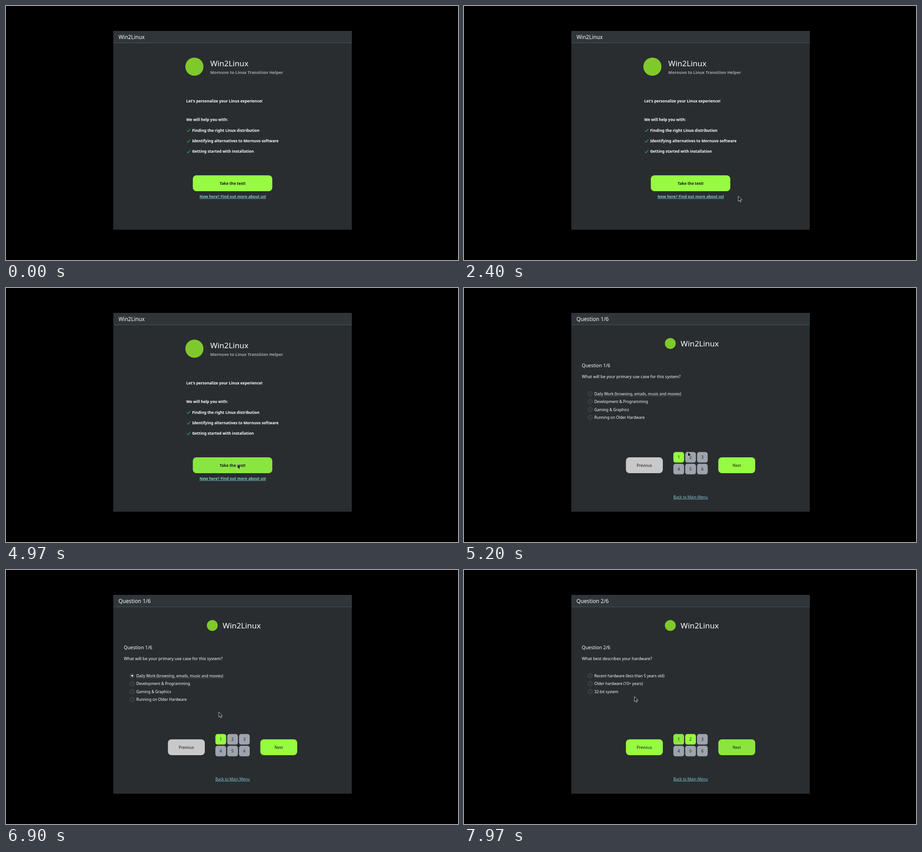
Write an HTML page that moves like this. It is 998 px wide and 561 px high and loops after 8 s.

```html
<!DOCTYPE html>
<html lang="en">
<head>
<meta charset="utf-8">
<title>Win2Linux</title>
<style>
  html, body { margin: 0; width: 100%; height: 100%; overflow: hidden; background: #000; }
  svg { display: block; width: 100%; height: 100%; }
  text { font-family: "Noto Sans", sans-serif; font-size: 8.43px; fill: #fcfcfc; white-space: pre; }
  .bold { font-weight: 700; }
  .mid { text-anchor: middle; }
  .dark { fill: #17191b; }
  .muted { fill: #a3a6a8; }
  .link { fill: #82c9ce; text-decoration: underline; }
</style>
</head>
<body>
<svg id="stage" viewBox="0 0 998 561"></svg>
<script>
const LOOP = 8000;
const LIME = '#97fb41', LIME_HOVER = '#8ae63f', GRAY = '#9ea4ad', LOGO = '#80c92b';
const stage = document.getElementById('stage');

function add(parent, tag, attrs = {}, content = '') {
  const node = document.createElementNS('http://www.w3.org/2000/svg', tag);
  for (const key in attrs) node.setAttribute(key, attrs[key]);
  node.textContent = content;
  parent.append(node);
  return node;
}
const label = (parent, x, y, content, cls = '', size = 8.43) =>
  add(parent, 'text', { x, y, class: cls, style: `font-size:${size}px` }, content);
const box = (parent, x, y, width, height, rx, fill) =>
  add(parent, 'rect', { x, y, width, height, rx, fill });
const show = (node, on) => node.setAttribute('visibility', on ? 'inherit' : 'hidden');

function button(parent, x, width, content, fill, cls = '') {
  const rect = box(parent, x, 374, width, 35, 8, fill);
  label(parent, x + width / 2, 394.6, content, 'mid dark ' + cls);
  return rect;
}

// Window frame
box(stage, 237, 55, 526.5, 439, 0, '#292d30');
box(stage, 237, 55, 526.5, 26, 0, '#30353a');
box(stage, 237, 81, 526.5, 0.9, 0, '#3d605b');

// Welcome page
const welcome = add(stage, 'g');
label(welcome, 248.5, 73.2, 'Win2Linux', '', 11.7);
add(welcome, 'circle', { cx: 416, cy: 134, r: 20, fill: LOGO });
label(welcome, 451, 132.8, 'Win2Linux', '', 17.1);
label(welcome, 451, 150.2, 'Mornuvo to Linux Transition Helper', 'bold muted', 9.05);
label(welcome, 398, 213.2, "Let's personalize your Linux experience!", 'bold');
label(welcome, 398, 254.2, 'We will help you with:', 'bold');
[
  'Finding the right Linux distribution',
  'Identifying alternatives to Mornuvo software',
  'Getting started with installation'
].forEach((line, i) => {
  const y = 277.5 + i * 23.4;
  add(welcome, 'path', {
    d: `M399.4 ${y - 2.6}l2.6 2.7 5-6.2`, fill: 'none', stroke: '#2fb565', 'stroke-width': 1.1
  });
  label(welcome, 411, y, line, 'bold');
});
const startButton = button(welcome, 412.5, 175.5, 'Take the test!', LIME, 'bold');
label(welcome, 500.7, 423.8, 'New here? Find out more about us!', 'mid bold link');

// Question pages
function questionPage(number, question, options) {
  const page = add(stage, 'g');
  const heading = `Question ${number}/6`;
  label(page, 248.3, 73.2, heading, '', 11.75);
  add(page, 'circle', { cx: 455.5, cy: 122.5, r: 12, fill: LOGO });
  label(page, 478.3, 129, 'Win2Linux', '', 17.1);
  label(page, 260, 174.6, heading, '', 10.42);
  label(page, 260.2, 199.2, question, '', 9.1);
  options.forEach((option, i) => {
    const y = 233.5 + i * 17.5;
    add(page, 'circle', {
      cx: 278.7, cy: y, r: 4.9, fill: '#2e3337', stroke: '#555c60', 'stroke-width': 0.8
    });
    label(page, 287.7, y + 3.1, option);
  });
  button(page, 357.5, 81.5, 'Previous', number > 1 ? LIME : '#c9c9c9');
  for (let i = 0; i < 6; i++) {
    const x = 462.3 + i % 3 * 26.1, y = 362.2 + Math.floor(i / 3) * 26;
    const fill = i + 1 < number ? LIME_HOVER : i + 1 === number ? LIME : GRAY;
    box(page, x, y, 23.6, 23.4, 5, fill);
    label(page, x + 11.8, y + 14.8, i + 1, 'mid dark');
  }
  const next = button(page, 561.5, 81.5, 'Next', number > 1 ? LIME_HOVER : LIME);
  label(page, 500.2, 464.8, 'Back to Main Menu', 'mid link');
  return { page, next };
}

const first = questionPage(1, 'What will be your primary use case for this system?', [
  'Daily Work (browsing, emails, music and movies)',
  'Development & Programming',
  'Gaming & Graphics',
  'Running on Older Hardware'
]);
box(first.page, 288, 238.7, 192, 0.6, 0, '#596052');
const choice = add(first.page, 'circle', { cx: 278.7, cy: 233.5, r: 2, fill: '#fff' });

const second = questionPage(2, 'What best describes your hardware?', [
  'Recent hardware (less than 5 years old)',
  'Older hardware (10+ years)',
  '32-bit system'
]);

const cursor = add(stage, 'path', {
  d: 'M0 0V11.2L2.6 8.8 4.4 12.7 6.3 11.8 4.6 8.1H8Z',
  fill: '#101214', stroke: '#f4f4f4', 'stroke-width': 0.8
});

// Pointer path: time, x, y
const path = [
  [1930, 758, 490], [2300, 640, 433], [2550, 555, 401], [2700, 524, 393],
  [2900, 504, 387], [3070, 511, 388.5], [5000, 511, 388.5], [5250, 490, 355],
  [5550, 415, 280], [5770, 378, 251.5], [5860, 378, 251.5], [6200, 284, 234],
  [6600, 284, 234], [6900, 469.5, 313.5], [7150, 575, 382], [7300, 589, 392],
  [7470, 589, 392], [7970, 376.3, 279.5], [LOOP, 376.3, 279.5]
];

function pointerAt(t) {
  const i = path.findIndex(step => step[0] > t);
  const [t0, x0, y0] = path[i - 1], [t1, x1, y1] = path[i];
  const k = (t - t0) / (t1 - t0);
  return [x0 + (x1 - x0) * k, y0 + (y1 - y0) * k];
}

function draw(t) {
  show(welcome, t < 5000);
  show(first.page, t >= 5000 && t < 7470);
  show(second.page, t >= 7470);
  show(choice, t >= 6300);
  startButton.setAttribute('fill', t >= 2530 ? LIME_HOVER : LIME);
  first.next.setAttribute('fill', t >= 7130 ? LIME_HOVER : LIME);
  const visible = t >= path[0][0];
  show(cursor, visible);
  if (visible) cursor.setAttribute('transform', `translate(${pointerAt(t)})`);
}

const start = performance.now();
function tick() {
  draw((performance.now() - start) % LOOP);
  requestAnimationFrame(tick);
}
tick();
</script>
</body>
</html>
```
